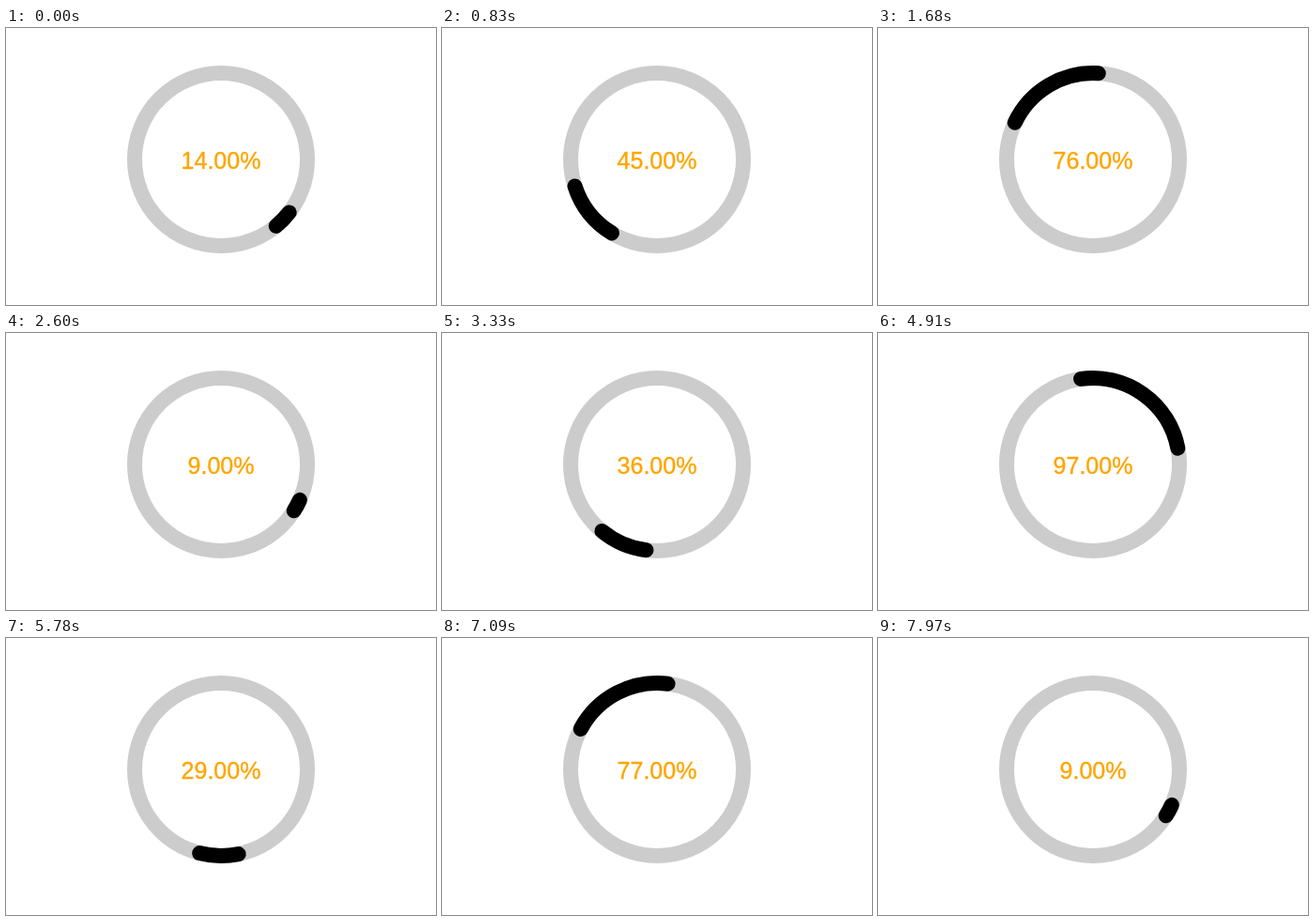
Animation, 458 px wide and 295 px high, one loop 8000 ms. Source, as an HTML page with a canvas:

```html
<!DOCTYPE html>
<html lang="en">
<head>
<meta charset="utf-8">
<title>Progress ring</title>
<style>
  html, body { margin: 0; width: 100%; height: 100%; overflow: hidden; background: #fff; }
  canvas { display: block; }
</style>
</head>
<body>
<canvas id="stage" width="458" height="295"></canvas>
<script>
const canvas = document.getElementById('stage');
const ctx = canvas.getContext('2d');
const LOOP = 8000;
const CX = 229, CY = 140, RADIUS = 92;
const BASELINE = 150;
const TURN = 2 * Math.PI;

// Running count at a time in ms: steady, with one short faster stretch.
const PACE = [[0, 14], [4110, 166], [4960, 200.1], [LOOP, 313]];

function percentAt(time) {
  const next = PACE.findIndex(([start]) => start > time);
  const [t0, n0] = PACE[next - 1];
  const [t1, n1] = PACE[next];
  const count = n0 + (n1 - n0) * (time - t0) / (t1 - t0);
  return Math.round(count) % 101;
}

function strokeArc(from, to, color) {
  ctx.beginPath();
  ctx.arc(CX, CY, RADIUS, from, to);
  ctx.lineWidth = 16;
  ctx.strokeStyle = color;
  ctx.stroke();
}

function drawLabel(text) {
  ctx.lineWidth = 0.4;
  ctx.strokeStyle = ctx.fillStyle = 'orange';
  ctx.fillText(text, CX, BASELINE);
  ctx.strokeText(text, CX, BASELINE);
}

function draw(percent) {
  const end = percent / 100 * TURN;
  ctx.clearRect(0, 0, canvas.width, canvas.height);
  strokeArc(0, TURN, '#ccc');
  strokeArc(end * 0.75, end, '#000');
  drawLabel(percent.toFixed(2) + '%');
}

ctx.lineCap = 'round';
ctx.font = '25px "Liberation Sans", Arial, sans-serif';
ctx.textAlign = 'center';

const begin = performance.now();
function tick() {
  draw(percentAt((performance.now() - begin) % LOOP));
  requestAnimationFrame(tick);
}
tick();
</script>
</body>
</html>
```
